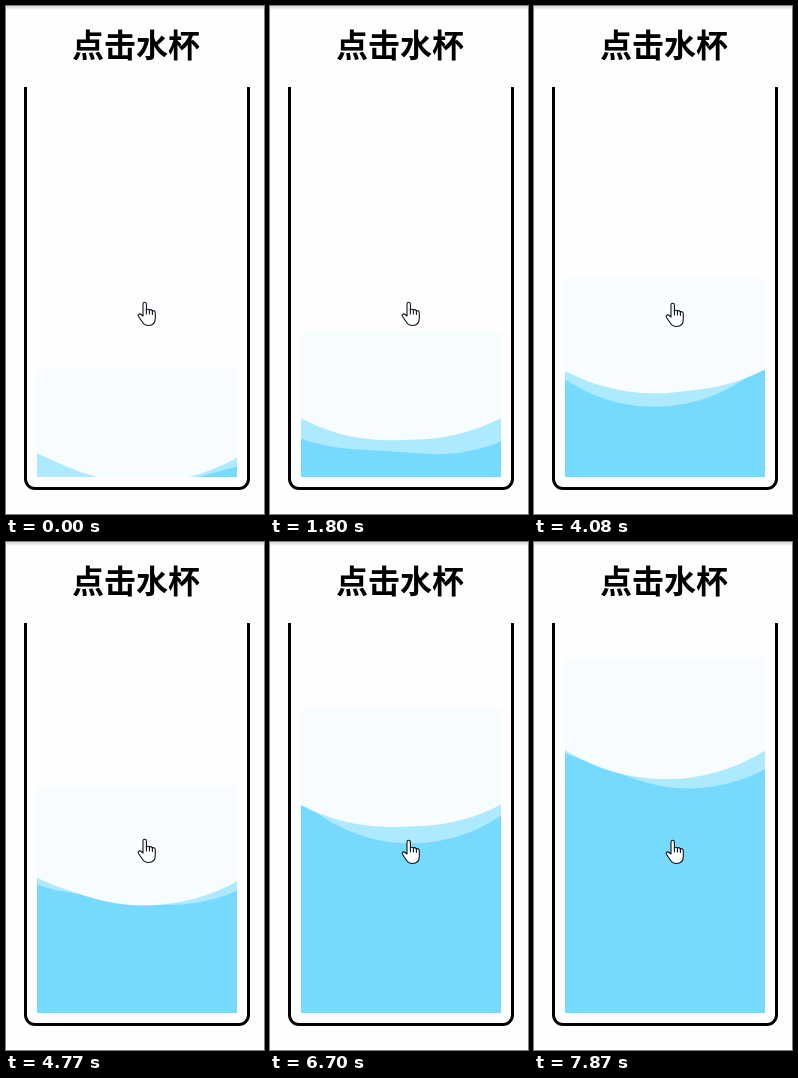
Write an HTML page with a canvas that moves like this. It is 258 px wide and 508 px high and loops after 7.99 s.

```html
<!DOCTYPE html>
<html lang="zh">
<head>
<meta charset="utf-8">
<style>
html, body { margin: 0; width: 100%; height: 100%; overflow: hidden; background: #fefefe; }
canvas { position: absolute; left: 0; top: 0; }
h1 {
  position: absolute; left: 0; top: 21px; width: 260px; margin: 0;
  font: bold 32px/32px "Noto Sans CJK SC", "Noto Sans CJK", sans-serif;
  text-align: center; color: #000; white-space: nowrap;
}
</style>
</head>
<body>
<canvas id="stage" width="258" height="508"></canvas>
<h1>点击水杯</h1>
<script>
const ctx = document.getElementById('stage').getContext('2d');
const LOOP = 7990, STEP = 135, RAD = Math.PI / 180;
const box = { x: 31, w: 200, bottom: 471 };

// Water level: time in ms and top edge
const level = [[0, 364], [1080, 336], [3030, 308], [4080, 273], [7990, 111]];

// The picture advances in even steps
const hold = t => Math.floor(t / STEP) * STEP + STEP / 3;

function along(keys, t) {
  const i = Math.max(1, keys.findIndex(k => t <= k[0]));
  const [t0, v0] = keys[i - 1], [t1, v1] = keys[i];
  return v0 + (v1 - v0) * (t - t0) / (t1 - t0);
}

// Small rise and fall of a turning shape that is a little off centre
const swing = (t, peak, period) => Math.cos((t - peak) / period * 2 * Math.PI);

function wave(cy, radius, angle, color) {
  ctx.save();
  ctx.translate(box.x + box.w / 2, cy);
  ctx.rotate(angle * RAD);
  ctx.beginPath();
  ctx.roundRect(-200, -200, 400, 400, radius);
  ctx.fillStyle = color;
  ctx.fill();
  ctx.restore();
}

function drawWater(t) {
  const top = Math.round(along(level, t));
  ctx.save();
  ctx.beginPath();
  ctx.rect(box.x, top, box.w, box.bottom - top);
  ctx.clip();
  ctx.fillStyle = '#76daff';
  ctx.fillRect(box.x, top, box.w, box.bottom - top);
  wave(top - 83.3 + 3.5 * swing(t, 1300, 5800), 160, 72 + 0.062 * t, 'rgba(255,255,255,.4)');
  wave(top - 86.7 + 5.5 * swing(t, 6300, 9700), 188, 22 + 0.037 * t, '#f7fcff');
  ctx.restore();
}

function drawCup() {
  const left = 19.5, right = 242.5, top = 81, bottom = 482.5, r = 9.5;
  ctx.strokeStyle = '#000';
  ctx.lineWidth = 3;
  ctx.beginPath();
  ctx.moveTo(left, top);
  ctx.arcTo(left, bottom, right, bottom, r);
  ctx.arcTo(right, bottom, right, top, r);
  ctx.lineTo(right, top);
  ctx.stroke();
}

const palm = new Path2D('M5.5 15V3Q5.5 1.2 7.2 1.2T8.9 3V8.7Q10.2 7.6 11.8 8.9' +
  'Q13.4 8 14.8 9.7Q17.8 9.2 17.8 12.2V17Q17.8 24.5 11 24.5Q7 24.5 4.8 21' +
  'L.9 15.2Q.2 13.4 1.7 12.9Q3 12.6 5.5 15Z');
const knuckles = new Path2D('M8.9 8.5V13M11.9 9V13M14.9 9.8V13.4');

function drawHand(t) {
  ctx.save();
  ctx.translate(131.5, 295 + Math.floor(t / 3270));
  ctx.lineWidth = 1.1;
  ctx.lineJoin = ctx.lineCap = 'round';
  ctx.strokeStyle = '#101020';
  ctx.fillStyle = '#fff';
  ctx.fill(palm);
  ctx.stroke(palm);
  ctx.stroke(knuckles);
  ctx.restore();
}

function draw(t) {
  ctx.fillStyle = '#fefefe';
  ctx.fillRect(0, 0, 258, 508);
  const shade = ctx.createLinearGradient(0, 0, 0, 4);
  shade.addColorStop(0, '#d6d6d6');
  shade.addColorStop(1, '#fefefe');
  ctx.fillStyle = shade;
  ctx.fillRect(0, 0, 258, 4);
  drawWater(t);
  drawCup();
  drawHand(t);
}

const start = performance.now();
function tick(now) {
  draw(Math.min(LOOP, hold(Math.max(0, now - start) % LOOP)));
  requestAnimationFrame(tick);
}
draw(hold(0));
requestAnimationFrame(tick);
</script>
</body>
</html>
```
